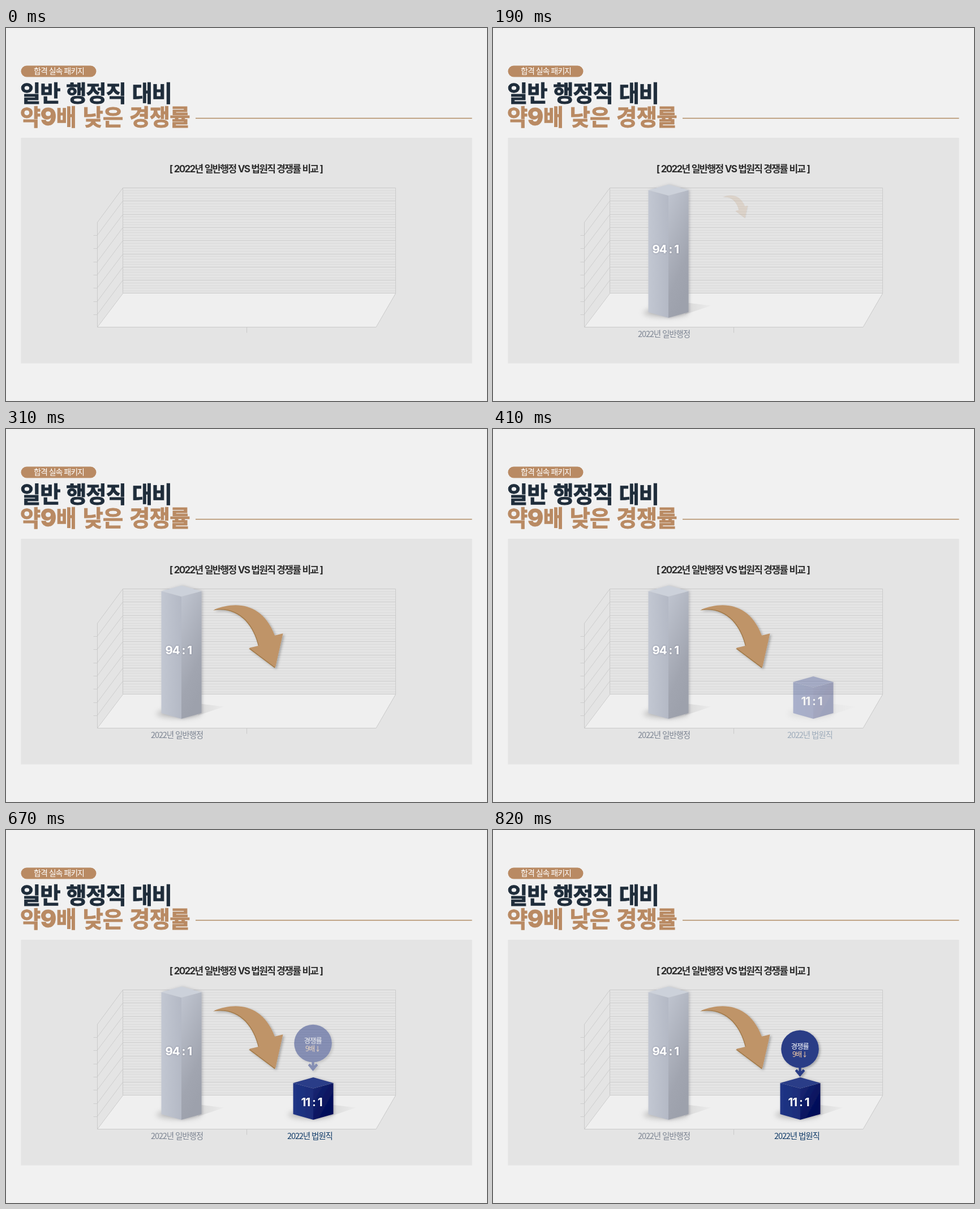
An HTML page for the animation above (8000 ms loop, 850x659 px).

```html
<!DOCTYPE html>
<html lang="ko">
<head>
<meta charset="utf-8">
<title>경쟁률 비교</title>
<style>
html, body { margin: 0; width: 100%; height: 100%; overflow: hidden; background: #f1f1f1; }
svg { display: block; width: 100%; height: 100%; }
text { font-family: "Noto Sans CJK KR", "Noto Sans CJK", sans-serif; }
.title { font-size: 39.5px; font-weight: 900; word-spacing: 1px; stroke-width: .9px; }
.title .digit { font: 800 43px Inter, sans-serif; }
.caption { font: 700 17px Inter, "Noto Sans CJK KR", "Noto Sans CJK", sans-serif; letter-spacing: -1.7px; word-spacing: .9px; }
.label { font-size: 14.5px; letter-spacing: -1.1px; font-weight: 350; }
.value { font: 700 20.5px Inter, sans-serif; letter-spacing: -1px; fill: #fff; }
</style>
</head>
<body>
<svg viewBox="0 0 850 659">
  <defs>
    <linearGradient id="grayL"><stop stop-color="#c2c7d2"/><stop offset="1" stop-color="#b4b9c5"/></linearGradient>
    <linearGradient id="grayR" x1="0" y1="0" x2=".35" y2="1"><stop stop-color="#c0c5d0"/><stop offset=".75" stop-color="#a1a5b0"/><stop offset="1" stop-color="#9da1ac"/></linearGradient>
    <linearGradient id="blueL"><stop stop-color="#203586"/><stop offset="1" stop-color="#1b2c78"/></linearGradient>
    <linearGradient id="blueR" x1="0" y1="0" x2="1" y2="1"><stop stop-color="#1a2b76"/><stop offset=".75" stop-color="#020c58"/></linearGradient>
    <linearGradient id="cast"><stop stop-color="#999" stop-opacity=".26"/><stop offset="1" stop-color="#999" stop-opacity=".04"/></linearGradient>
    <filter id="soft" x="-50%" y="-100%" width="200%" height="300%"><feGaussianBlur stdDeviation="5"/></filter>
    <filter id="drop" x="-20%" y="-20%" width="140%" height="140%"><feDropShadow dx="2.5" dy="2" stdDeviation="2" flood-opacity=".28"/></filter>
    <filter id="side" x="-20%" y="-10%" width="140%" height="120%"><feDropShadow dx="2" dy="0" stdDeviation="2" flood-color="#556" flood-opacity=".3"/></filter>
    <filter id="glow" x="-20%" y="-40%" width="140%" height="180%"><feDropShadow dx="0" dy="0" stdDeviation="1.5" flood-color="#223" flood-opacity=".35"/></filter>
    <path id="swoop" d="M366 320.5C405 305 452 308 474 366L488.500 362.500L475 422.500L429 388L446 384C437 345 410 313 366 320.500Z"/>
  </defs>

  <rect width="850" height="659" fill="#f1f1f1"/>
  <rect x="26.500" y="66.500" width="133" height="20" rx="10" fill="#b98a63"/>
  <text x="49" y="81.300" font-size="14" letter-spacing="-1" fill="#fff">합격 실속 패키지</text>
  <text class="title" x="25" y="130" letter-spacing="-1.2" fill="#1f2d3b" stroke="#1f2d3b">일반 행정직 대비</text>
  <text class="title" x="25" y="172" letter-spacing="-.7" fill="#b98a63" stroke="#b98a63">약<tspan class="digit">9</tspan>배 낮은 경쟁률</text>
  <path d="M335 159.500H823.500" stroke="#b08a62" stroke-width="1.500"/>
  <rect x="26.500" y="194" width="797" height="398.500" fill="#e4e4e4"/>
  <text class="caption" x="424" y="254.500" text-anchor="middle" fill="#2d2d2d">[ 2022년 일반행정 VS 법원직 경쟁률 비교 ]</text>

  <path d="M206 469H688L654 528.500H161Z" fill="#efefef"/>
  <g fill="none">
    <path id="minor" stroke="#dadada"/>
    <path id="major" stroke="#cdcdcd"/>
    <path stroke="#cacaca" d="M161 344L206.500 282.500H688.500V469L654 528.500H161.500V344M206.500 282.500V468.500H688M206.500 469L161.500 528.500M425.500 529V538.500"/>
  </g>

  <g id="gray"></g>
  <g id="blue"></g>

  <g id="arrow">
    <g filter="url(#drop)">
      <use href="#swoop" fill="#a27a49"/>
      <use href="#swoop" fill="#bf9468" transform="translate(1 -1.200)"/>
    </g>
  </g>

  <g id="badge">
    <g filter="url(#drop)">
      <circle cx="542.500" cy="387" r="33.300" fill="#2a3c86"/>
      <path d="M542.500 419V432M535.300 424L542.500 432.500L549.700 424" fill="none" stroke="#2a3c86" stroke-width="4.500"/>
    </g>
    <g font-size="12.500" letter-spacing="-1.100">
      <text x="526.500" y="386.700" fill="#fff">경쟁률</text>
      <text x="529" y="401.200" fill="#f3cba4">9배</text>
    </g>
    <path d="M551 391.500V401M549 398.500L551 401.300L553 398.500" fill="none" stroke="#f3cba4"/>
  </g>
</svg>
<script>
const LOOP = 8000, STEP = 30;
const el = id => document.getElementById(id);
const snap = v => Math.floor(v) + 0.5;

function drawGrid() {
  const gap = 186.5 / 8;
  let major = "", minor = "";
  for (let i = 0; i < 8; i++) {
    const y = 282.5 + i * gap, left = snap(343.3 + i * gap);
    if (i) major += `M154.500 ${left}H161L206.500 ${snap(y)}H688`;
    for (let j = 1; j < 5; j++) minor += `M206.500 ${snap(y + j * gap / 5)}H688`;
  }
  el("major").setAttribute("d", major);
  el("minor").setAttribute("d", minor);
}

// A square column with its left edge at x and its upper corners at y.
function column(id, x, y, lid, value, valueX, valueY, name, nameX, ink) {
  const mid = x + 35.5, right = x + 71, base = 502;
  el(id).innerHTML = `
    <ellipse cx="${x + 31}" cy="503" rx="40" ry="8" fill="#777" opacity=".36" filter="url(#soft)"/>
    <path d="M${right - 6} 485L${right + 40} 490.500L${right - 6} 506Z" fill="url(#cast)"/>
    <g filter="url(#side)">
      <path d="M${x} ${y}L${mid} ${y + 9.5}V512L${x} ${base}Z" fill="url(#${id}L)"/>
      <path d="M${right} ${y}L${mid} ${y + 9.5}V512L${right} ${base}Z" fill="url(#${id}R)"/>
      <path d="M${x} ${y}L${mid} ${y - 10}L${right} ${y}L${mid} ${y + 9.5}Z" fill="${lid}"/>
    </g>
    <text class="value" x="${valueX}" y="${valueY}" filter="url(#glow)">${value}</text>
    <text class="label" x="${nameX}" y="546.300" fill="${ink}">${name}</text>`;
}

const clamp = (v, lo, hi) => Math.min(hi, Math.max(lo, v));
const stepsSince = (t, start, count) => clamp(Math.floor((t - start) / STEP) + 1, 0, count);

function pose(id, opacity, transform) {
  el(id).setAttribute("opacity", opacity);
  el(id).setAttribute("transform", transform);
}

function slideIn(id, t, start) {
  const p = stepsSince(t, start, 3) / 3;
  pose(id, p, `translate(${34.5 * (1 - p)} 0)`);
}

function render(t) {
  slideIn("gray", t, 30);
  slideIn("blue", t, 410);

  const a = stepsSince(t, 190, 5) / 5;
  pose("arrow", a, `translate(428 ${367 - 64 * (1 - a)}) scale(${0.2 + 0.8 * a}) translate(-428 -367)`);

  const b = stepsSince(t, 670, 6);
  pose("badge", b && 0.4 + 0.1 * b, `translate(0 ${2 * b - 12})`);
}

drawGrid();
column("gray", 274.5, 286.5, "#ccd1da", "94 : 1", 281.5, 398, "2022년 일반행정", 256, "#7d8593");
column("blue", 507.5, 447, "#2b3e88", "11 : 1", 521.5, 488, "2022년 법원직", 497, "#123c69");

const began = performance.now();
function tick() {
  render((performance.now() - began) % LOOP);
  requestAnimationFrame(tick);
}
tick();
</script>
</body>
</html>
```
